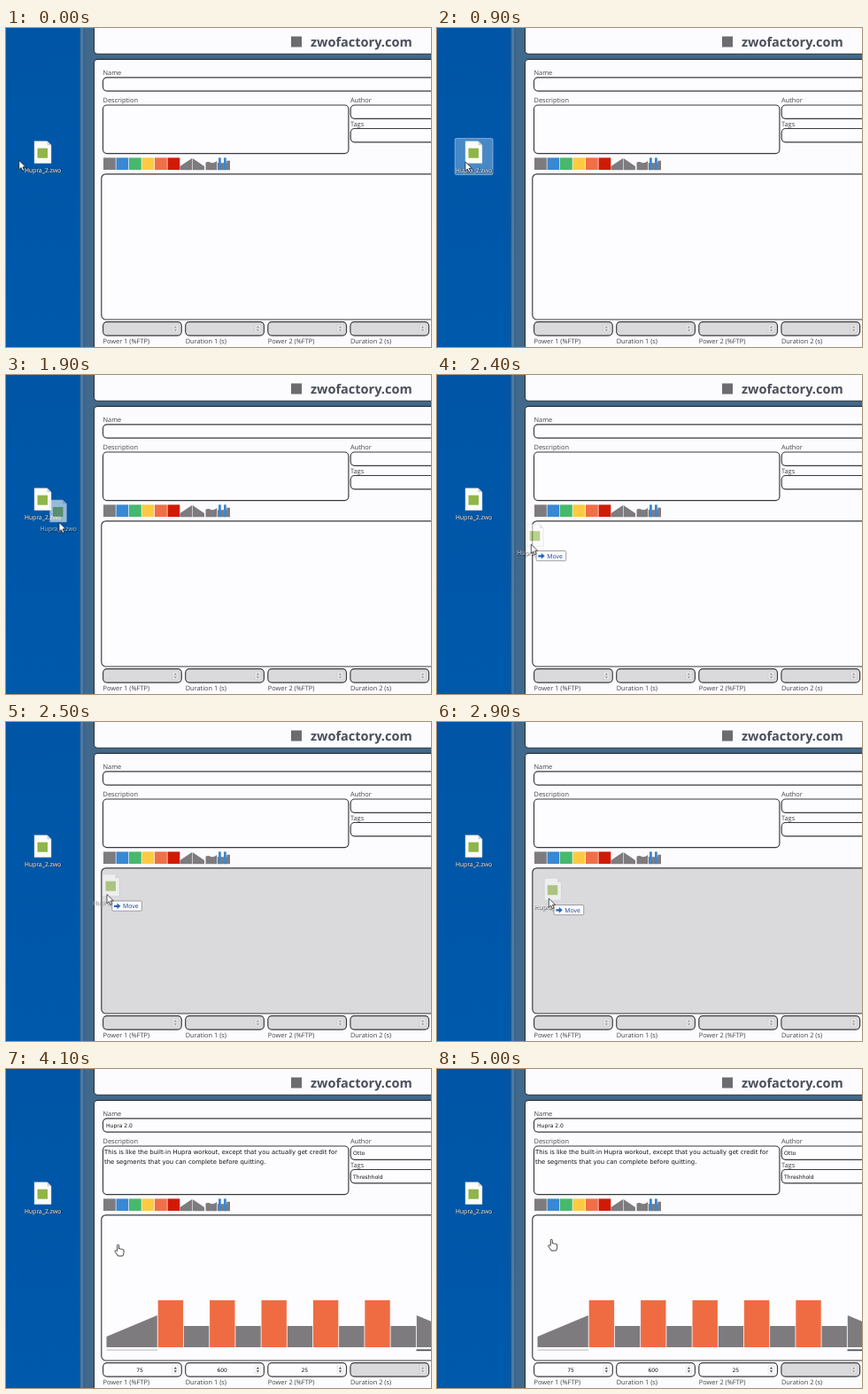
Recreate the animation shown at these times as an HTML page. Size 480 by 360 pixels, loop 5100 ms.

```html
<!DOCTYPE html>
<html lang="en">
<head>
<meta charset="utf-8">
<title>Workout file drop</title>
<style>
  html, body { margin: 0; width: 100%; height: 100%; overflow: hidden; background: #0057a8; }
  svg { display: block; width: 100vw; height: 100vh; }
  text { font-family: "Open Sans", "Noto Sans", sans-serif; font-size: 7.4px; fill: #434449; text-rendering: geometricPrecision; white-space: pre; }
  .title { font-size: 14.5px; font-weight: bold; fill: #4a4f5b; }
  .value, .note { font-family: "DejaVu Sans", sans-serif; fill: #111; }
  .value { font-size: 6.05px; }
  .note { font-size: 6.88px; }
  .mid { text-anchor: middle; }
  .file, .tip { font-size: 6.9px; }
  .file { fill: #fff; stroke: #fff; stroke-width: .15; text-anchor: middle; text-shadow: .4px .5px .8px #000; }
  .tip { fill: #1c3f94; }
  .panel { fill: #fcfbfd; stroke: #2c333b; stroke-width: 1.1; }
  .box { fill: #fdfcfe; stroke: #3a3a3d; stroke-width: 1.15; }
  .off { fill: #dad9dc; }
  .grey { fill: #7e7b7f; }
  .work { fill: #ef6c43; }
</style>
</head>
<body>
<svg viewBox="0 0 480 360" preserveAspectRatio="none">
  <defs>
    <linearGradient id="sky" x2="0" y2="1">
      <stop offset="0" stop-color="#0055a6"/><stop offset="1" stop-color="#0059ab"/>
    </linearGradient>
    <g id="file">
      <path d="M-9.5-12.5H5l4.5 4.5V12.5h-19z" fill="#fbfcfa" stroke="#b9c0c4" stroke-width=".5"/>
      <path d="M5-12.5V-8h4.5z" fill="#cfd5d8"/>
      <rect x="-6" y="-4.5" width="11.5" height="11" fill="#8fb548"/>
      <text class="file" x=".2" y="22.6">Hupra_2.zwo</text>
    </g>
  </defs>

  <rect width="480" height="360" fill="url(#sky)"/>
  <rect x="83.5" width="5" height="360" fill="#4f7ca5"/>
  <rect x="83.5" width=".7" height="360" fill="#1d4a78"/>
  <rect x="87.5" width="1" height="360" fill="#2c5273"/>
  <rect x="88.5" width="392" height="360" fill="#41698b"/>
  <rect class="panel" x="99.5" y="-8" width="400" height="37.2" rx="4"/>
  <rect class="panel" x="99.5" y="35.4" width="400" height="400" rx="4"/>
  <rect x="322" y="9.5" width="12" height="12" fill="#6b6b70"/>
  <text class="title" x="344" y="20.8">zwofactory.com</text>

  <g id="form"></g>
  <g id="tools"></g>
  <rect id="chart" class="box" x="107.8" y="164.8" width="400" height="164.2" rx="5"/>
  <g id="plan"></g>
  <g id="filled">
    <text class="value" x="113" y="65.7">Hupra 2.0</text>
    <text class="note" x="111" y="95.8">This is like the built-in Hupra workout, except that you actually get credit for</text>
    <text class="note" x="111" y="106.6">the segments that you can complete before quitting.</text>
    <text class="value" x="392" y="96.8">Otto</text>
    <text class="value" x="392" y="123.5">Threshhold</text>
  </g>

  <rect id="hover" x="20.3" y="124.6" width="42.8" height="41" rx="1.5" fill="#a9cdf0" fill-opacity=".42" stroke="#c4def5" stroke-opacity=".65" stroke-width=".8"/>
  <use href="#file" x="41.5" y="140.2"/>
  <use id="ghost" href="#file" opacity=".6"/>
  <g id="tip">
    <rect x="5.8" y="7.5" width="33.6" height="11.2" rx="1" fill="#fbfbfd" stroke="#8a8a92" stroke-width=".8"/>
    <path d="M8 12.2h3.5V10l4 3.3-4 3.3v-2.2H8z" fill="#2466b8"/>
    <text class="tip" x="18" y="15.8">Move</text>
  </g>
  <path id="arrow" d="M0 0V10.2L2.4 8 4 11.8 5.8 11 4.2 7.3H7.4z" fill="#fff" stroke="#111" stroke-width=".7"/>
  <path id="hand" d="M-1.2 6.6V.8Q-1.2-.2-.2-.2T.8.8V4.4Q1.9 3.6 2.8 4.8 3.9 4.1 4.7 5.2 6.2 4.7 6.2 6.4V9Q6 10.6 5 12.5H-.4Q-1.5 10.4-3.6 7.8-4.2 6.5-3.1 6.3-2.2 6.2-1.2 7.5" fill="#fff" stroke="#111" stroke-width=".8" stroke-linejoin="round"/>
</svg>
<script>
const LOOP = 5100, STEP = 100, DRAG = 1600, ENTER = 2500, DROP = 3400;
const $ = id => document.getElementById(id);

function add(parent, tag, attrs, text) {
  const el = document.createElementNS("http://www.w3.org/2000/svg", tag);
  for (const key in attrs) el.setAttribute(key, attrs[key]);
  if (text) el.textContent = text;
  return $(parent).appendChild(el);
}
const rect = (parent, x, y, width, height, attrs) => add(parent, "rect", { x, y, width, height, ...attrs });
const label = (parent, x, y, text, cls = "") => add(parent, "text", { x, y, class: cls }, text);
const box = (x, y, w, h) => rect("form", x, y, w, h, { rx: 4.5, class: "box" });

label("form", 109.5, 53.4, "Name");
box(109.5, 55.8, 400, 15.3);
label("form", 109.5, 84, "Description");
box(109.5, 87, 277.4, 54.6);
label("form", 389, 84, "Author");
box(389.2, 87, 120, 15.3);
label("form", 389, 110.9, "Tags");
box(389.2, 113.5, 120, 15.3);

// Number fields below the chart; the last one stays disabled.
const fields = [["Power 1 (%FTP)", "75"], ["Duration 1 (s)", "600"], ["Power 2 (%FTP)", "25"], ["Duration 2 (s)", ""]]
  .map(([name, value], i) => {
    const x = 109.6 + i * 93.1;
    const frame = box(x, 331.6, 88.7, 15.5);
    rect("form", x + 78.2, 334.8, 7, 9, { rx: 1, fill: "#f4f4f6", "fill-opacity": .4, stroke: "#a9a9ae", "stroke-width": .4, "stroke-opacity": .6 });
    const spin = add("form", "path", { d: `M${x + 80.1} 338.4l1.6-2.1 1.6 2.1zm0 1.9l1.6 2.1 1.6-2.1z` });
    label("form", x, 355.7, name);
    if (value) label("filled", x + 41.5, 341.6, value, "value mid");
    return { frame, spin, value };
  });

["#7d7b7f", "#3888d3", "#46b96d", "#ffca42", "#ef6f48", "#d11a05"].forEach((fill, i) =>
  rect("tools", 110 + i * 14.5, 146.4, 13.8, 13.7, { fill }));
add("tools", "path", { class: "grey", d: "M196.5 160.2V156l13.5-9v13.2zM210.6 160.2V147l13.4 9v4.2zM225.5 160.2v-8.4q3 -1.6 6 .3 3.5 .8 6.8-2v10.1zM239 160.2v-8h14v8zM249.3 160.2V149.8H253v10.4z" });
for (const x of [240, 246]) rect("tools", x, 146.4, 2.8, 13.7, { fill: "#3888d3" });

const BASE = 314, PERIOD = 58.4;
add("plan", "path", { class: "grey", d: `M113.5 ${BASE}V302L170.8 278V${BASE}zM463.8 ${BASE}V278L521 302V${BASE}z` });
for (let i = 0; i < 5; i++) {
  const x = 171.7 + i * PERIOD;
  rect("plan", x, 261, 28.4, BASE - 261, { class: "work" });
  rect("plan", x + 29.2, 290, 28.4, BASE - 290, { class: "grey" });
}
rect("plan", 113.5, 316.4, 57.5, 1.6, { fill: "#d2d1d5" });
rect("plan", 463.5, 316.4, 17, 1.8, { fill: "#50535f" });

// Pointer path: time, x, y
const path = [
  [0, 14.8, 149.5], [400, 14.8, 149.5], [500, 18, 150], [700, 26, 151], [900, 32, 151],
  [1000, 34, 150.5], [1100, 36, 150], [1500, 36, 150], [1700, 43, 155], [1900, 60, 166.5],
  [2100, 80, 177], [2300, 98.5, 187], [2400, 106.3, 191], [2500, 114, 194.5], [2700, 123, 197.5],
  [2900, 126.3, 199], [3300, 126.3, 199], [3400, 126.8, 198.5], [4900, 126.8, 198.5], [5000, 129.5, 192.5], [LOOP, 129.5, 192.5]
];
function pointer(t) {
  const i = path.findIndex(p => p[0] > t);
  const [t0, x0, y0] = path[i - 1], [t1, x1, y1] = path[i];
  const k = (t - t0) / (t1 - t0);
  return [x0 + (x1 - x0) * k, y0 + (y1 - y0) * k];
}

const show = (el, on) => { el.style.display = on ? "" : "none"; };
const place = (el, x, y) => el.setAttribute("transform", `translate(${x} ${y})`);

function draw(now) {
  const t = Math.floor((now % LOOP) / STEP) * STEP;
  const [x, y] = pointer(t);
  const dropped = t >= DROP, dragging = t >= DRAG && !dropped;

  show($("hover"), t >= 600 && t < DRAG + STEP);
  show($("ghost"), dragging);
  show($("tip"), dragging && x > 100);
  show($("arrow"), !dropped);
  show($("hand"), dropped);
  show($("plan"), dropped);
  show($("filled"), dropped);
  $("chart").classList.toggle("off", dragging && t >= ENTER);
  for (const { frame, spin, value } of fields) {
    const on = dropped && value;
    frame.classList.toggle("off", !on);
    spin.setAttribute("fill", on ? "#444" : "#98989d");
  }

  // The dragged icon trails the pointer until it reaches the window.
  const [dx, dy] = t < 2200 ? [-1, -13] : [4.5, -10.3];
  place($("ghost"), x + dx, y + dy);
  for (const id of ["tip", "arrow", "hand"]) place($(id), x, y);
}

function tick() {
  draw(performance.now());
  requestAnimationFrame(tick);
}
tick();
</script>
</body>
</html>
```
